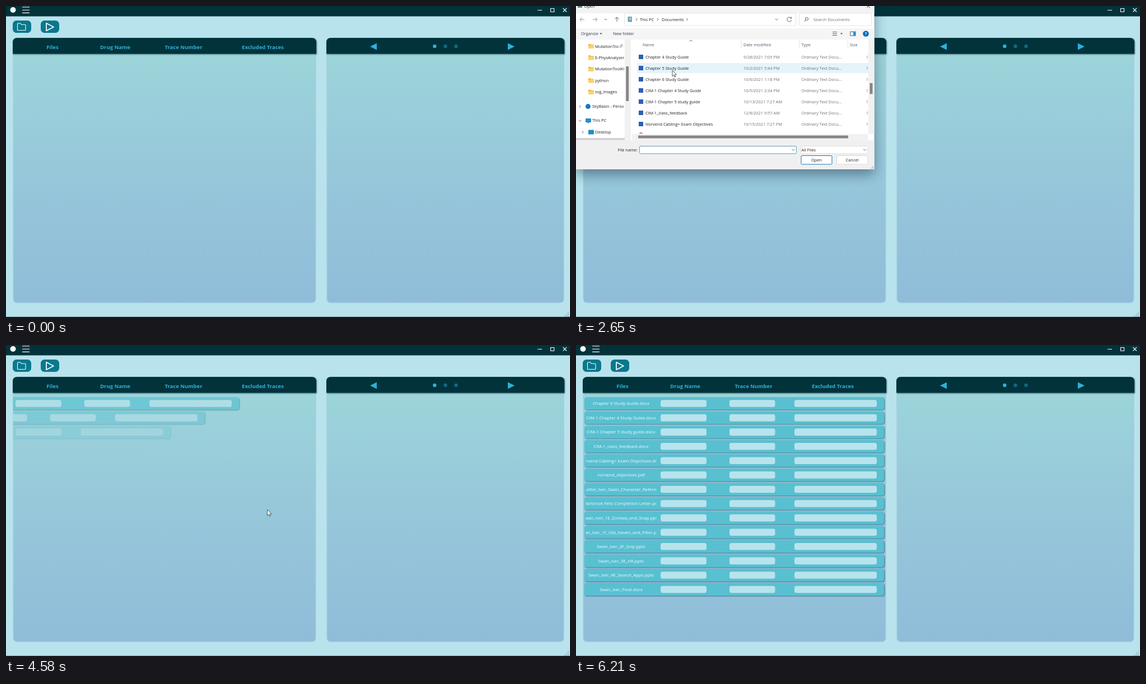
An HTML page for the animation above (6.61 s loop, 1007 px wide and 556 px high).

```html
<!DOCTYPE html>
<html lang="en">
<head>
<meta charset="utf-8">
<title>Trace file picker</title>
<style>
html, body { margin: 0; width: 100%; height: 100%; overflow: hidden; background: #b8e3ec; }
svg { display: block; width: 1007px; height: 556px; font: 7.4px "Open Sans", "Noto Sans", sans-serif; }
text { white-space: pre; }
.head { font-weight: 700; font-size: 9.5px; fill: #2fb0d8; text-anchor: middle; }
.file { font-size: 7.8px; fill: #f2fcfd; text-anchor: middle; }
.bar { filter: drop-shadow(1px 1px 1px rgba(0, 40, 60, .6)); }
.card { filter: drop-shadow(1px 1.5px .8px rgba(20, 80, 110, .7)); }
.sheet { filter: drop-shadow(0 9px 11px rgba(0, 20, 40, .42)); }
.line { fill: none; stroke: #555; stroke-width: .9; }
.white { fill: none; stroke: #fff; stroke-width: 1.1; }
</style>
</head>
<body>
<svg id="stage" viewBox="0 0 1007 556"></svg>
<script>
const LOOP = 6610;
const BURSTS = [[120, 720, 10], [790, 1400, 10], [1460, 2050, 10], [2250, 2850, 9], [2920, 3530, 10],
  [3600, 4230, 10], [4300, 4910, 10], [4980, 5590, 10], [5790, 6210, 7]];
const ticks = [0];
for (const [a, b, n] of BURSTS)
  for (let i = 0; i < n; i++) ticks.push(Math.round((a + (b - a) * i / (n - 1)) / 10) * 10);

// Each key is [time, ...values]
const CURSOR = [[120, 807, 511], [420, 330, 250], [720, 62, 74], [920, 33, 40], [1200, 35, 42], [1330, 51.5, 57.5],
  [1460, 75, 80], [1730, 188, 168], [2250, 188, 168], [2500, 172, 115], [2850, 172, 115], [3120, 172, 139],
  [3210, 172, 139], [3460, 172, 194], [3600, 172, 194], [4000, 420.5, 281], [4300, 420.5, 281],
  [4910, 524.5, 311], [5590, 832, 440], [5790, 832, 440], [6210, 975, 558]];
const SCROLL = [[1520, 0], [1900, 292], [2250, 292], [2650, 532], [2920, 532], [3120, 592], [3210, 592], [3400, 712]];
const DIALOG = [[1200, 0, .88], [1330, .86, .9486], [1400, 1, 1], [4290, 1, 1], [4440, 0, .9]];
const SLIDE = [[0, 0], [.17, .103], [.37, .313], [.57, .493], [.77, .793], [.97, .972], [1, 1]];
const CLICK = 2780, RANGE_CLICK = 3530, FIRST = 28, LAST = 41;

const NAMES = ["Chapter 6 Study Guide", "CIM-1 Chapter 4 Study Guide", "CIM-1 Chapter 5 study guide",
  "CIM-1_class_feedback", "Norvend Cabling+ Exam Objectives", "norvend_objectives",
  "Court_Letter_Iver_Swan_Character_Reference", "Marbrook Fells Completion Letter",
  "Swan_Iver_1E_Zontala_and_Snap", "Swan_Iver_1F_Old_Haven_and_Filter", "Swan_Iver_2F_Snip",
  "Swan_Iver_3E_HR", "Swan_Iver_4E_Search_Apps", "Swan_Iver_Final"];
const FOLDERS = `Oath of Rust Hidden Frontier|7/18/2022 4:40 PM
Oath of Rust Sentinel|7/20/2022 6:19 PM
CSS - Full Layout Primer 2022|7/11/2022 3:01 PM
Custom Office Templates|1/4/2022 5:51 PM
E-PhysAnalyzer|5/13/2022 8:05 PM
E-PhysAnalyzer2|8/31/2022 6:48 PM
E-PhysAnalyzerGUI|5/13/2022 8:05 PM
GUI drafts|8/31/2022 6:50 PM
images|5/13/2022 8:05 PM
labs|5/13/2022 8:05 PM
models|6/2/2022 3:12 PM
MutationToolKit|8/20/2022 1:15 PM
notes|5/13/2022 8:06 PM
plots|5/13/2022 8:06 PM
NetBeansProjects|5/13/2022 8:06 PM
Jotfold Notebooks|5/13/2022 8:06 PM
Python Scripts|3/23/2022 5:22 PM
QtApplicationWithPython|5/17/2022 1:33 PM
QtTemplate|8/14/2022 6:26 PM
R|5/13/2022 8:06 PM
Tandrel|8/15/2022 9:37 PM
temp|6/22/2022 1:07 PM
test_data|7/2/2022 2:20 PM
traces|7/9/2022 4:11 PM`;
const LOOSE = `abstract_draft|9/14/2021 3:10 PM|w|1
Chapter 3 Study Guide|9/21/2021 6:32 PM|w|1
Chapter 4 Study Guide|9/28/2021 7:05 PM|w|1
Chapter 5 Study Guide|10/2/2021 5:44 PM|w|1`;
const DETAILS = `10/6/2021 1:18 PM|w|1
10/5/2021 2:34 PM|w|1
10/13/2021 7:27 AM|w|1
12/8/2021 9:57 AM|w|1
10/15/2021 7:27 PM|w|1
1/6/2022 2:09 PM|h|2,54
8/10/2022 11:06 PM|h|13
8/8/2022 12:41 PM|h|3
1/17/2022 1:51 PM|p|74
1/25/2022 4:58 PM|p|60
2/1/2022 8:10 PM|p|44
2/1/2022 9:20 PM|p|14
2/3/2022 1:31 PM|p|24
3/18/2022 2:29 PM|w|1`.split("\n");
const TYPES = { w: "Ordinary Text Docu...", p: "Ordinary Slide Sho...", h: "Browser HTML Docu...", z: "Compressed (zipped..." };
const EXT = { w: ".docx", p: ".pptx", h: ".pdf" };
const items = [...FOLDERS.split("\n"), ...LOOSE.split("\n"), ...NAMES.map((n, i) => n + "|" + DETAILS[i]),
  "E-PhysAnalyzerGUI|2/23/2022 2:54 PM|z|14"].map(s => s.split("|"));

const rect = (x, y, w, h, fill, more = "") => `<rect x="${x}" y="${y}" width="${w}" height="${h}" fill="${fill}" ${more}/>`;
const path = (d, more = 'class="line"') => `<path d="${d}" ${more}/>`;
const text = (x, y, s, more = 'fill="#222"') => `<text x="${x}" y="${y}" ${more}>${s}</text>`;
const clip = (id, x, y, w, h) => `<clipPath id="${id}">${rect(x, y, w, h, "#000")}</clipPath>`;
const group = (id, body, more = "") => `<g id="${id}" ${more}>${body}</g>`;
const GREY = 'fill="#707070"';
const chevR = (x, y) => path(`M${x - 1.2} ${y - 2.4}l2.4 2.4l-2.4 2.4`);
const chevD = (x, y) => path(`M${x - 2.5} ${y - 1.2}l2.5 2.5l2.5-2.5`);
const folder = (x, y) => path(`M${x} ${y - 4}h4l1.2 1.2h4.8v6.8h-10z`, 'fill="#eeb33c"') + rect(x, y - 1.8, 10, 5.8, "#fbd369", 'rx=".6"');

function icon(kind, y) {
  if (kind === "w") return rect(112, y - 4, 8, 8, "#2b5fb4");
  if (kind === "p") return rect(112, y - 4, 8, 8, "#c8472c");
  if (kind === "h") return `<circle cx="116" cy="${y}" r="4.7" fill="#d9503c"/>`;
  return folder(111, y) + (kind === "z" ? rect(115, y - 3, 2, 6, "#7d8790") : "");
}

function panel(x, w) {
  return path(`M${x + 1} 80h${w - 2}v443q0 7.5-7.5 7.5h${17 - w}q-7.5 0-7.5-7.5z`,
    'fill="url(#sea)" stroke="#a5cce2" stroke-width="1.4"') +
    path(`M${x} 85.5v-20.500q0-8 8-8h${w - 16}q8 0 8 8v20.500z`, 'fill="#02333b" class="bar"');
}

function app() {
  const button = x => rect(x, 26, 33, 22, "#0a788d", 'rx="6.500"');
  let grip = "";
  for (let i = 0; i < 3; i++)
    for (let j = 0; j <= i; j++) grip += rect(1003 - j * 3, 547.5 + i * 3, 1.5, 1.5, "#7d9ca5");
  return rect(0, 0, 1007, 556, "#b8e3ec") + rect(0, 555, 1007, 1, "#86a9b0") + rect(0, 0, 1007, 18.5, "#02333b") +
    '<circle cx="12.500" cy="7" r="5" fill="#fff"/>' +
    path("M29 2h13M29 7.2h13M29 12.400h13", 'class="white"') +
    path("M949 7.500h8M972.500 4.500h6v6h-6zM994.500 4l6.500 6.500m0-6.500l-6.500 6.500", 'class="white"') +
    button(12) + button(62) +
    path("M20.500 42.500v-10.500q0-1 1-1h4l2 2.300h6.500q1 0 1 1v8.200q0 1-1 1h-12.500q-1 0-1-1z", 'class="white"') +
    path("M72 30.700v13.600l13-6.800z", 'class="white" style="stroke-width:1.7;stroke-linejoin:round"') +
    panel(12, 542) + panel(572, 425) +
    [["Files", 83], ["Drug Name", 195], ["Trace Number", 317], ["Excluded Traces", 458.5]]
      .map(([s, x]) => text(x, 77, s, 'class="head"')).join("") +
    path("M650 72.500l12-6v12zM908 72.500l-12-6v12z", 'fill="#2fb0d8"') +
    [765.3, 784.5, 803.5].map((x, i) => `<circle cx="${x}" cy="72" r="3.200" fill="${i ? "#12697d" : "#2fb0d8"}"/>`).join("") +
    grip;
}

function cards() {
  return NAMES.map((n, i) => {
    const y = 104.5 + i * 25.58, kind = DETAILS[i].split("|")[1];
    const cell = (x, w) => rect(x, y - 6.3, w, 12.6, "#b8e3ec", 'rx="3.500"');
    return group("card" + i, rect(15, y - 11, 535, 22, "#58c0d1", 'rx="4" class="card"') +
      cell(151, 82) + cell(274, 81.5) + cell(390, 147) +
      `<g clip-path="url(#name)">${text(80.5, y + 2.8, n + EXT[kind], 'class="file"')}</g>`);
  }).join("");
}

function listRows() {
  return items.map(([name, date, kind, size], i) => {
    const y = 91 + 20 * i, b = y + 2.6;
    return rect(109, y - 9, 413, 18, "none", `id="row${i}"`) + icon(kind, y) + text(124, b, name) +
      text(299, b, date, GREY) + text(402.5, b, TYPES[kind] || "File folder", GREY) +
      (size ? text(522, b, size, GREY + ' text-anchor="end"') : "");
  }).join("");
}

function dialog() {
  const side = [["MutationToc", 72], ["E-PhysAnalyzer.", 92.3], ["MutationToolKit", 112.8], ["python", 133.3], ["svg_images", 153.8]];
  const screen = (x, y) => rect(x, y - 4, 10, 7, "#2a8fd0", 'rx=".8"') + rect(x + 3, y + 3.2, 4, 1, "#55707c");
  const pages = side.map(([, y]) => chevR(13.7, y) +
    path(`M24 ${y - 4.5}h4.500l2.500 2.500v7h-7z`, 'fill="#fff" stroke="#888" stroke-width=".7"')).join("");
  const sidebar = side.map(([s, y], i) => text(34, y + 2.6, s, i ? 'fill="#222"' : 'fill="#222" clip-path="url(#pinned)"')).join("") +
    path("M78 74.500l2-2m-1.500-1.500l3 3m-2-3.500l2.500-1.800l1.300 1.300l-1.800 2.500", 'class="line" style="stroke:#567"') +
    text(29, 182.2, "SkyBasin - Personal") + chevR(7, 179.6) +
    chevD(7, 205) + screen(17, 205) + text(29, 207.4, "This PC") +
    chevR(12, 225.5) + rect(22, 221.500, 10, 8, "#1d8fc7", 'rx="1"') + text(34, 228, "Desktop");
  const base = rect(-1, -12, 533.5, 304, "#fff", 'rx="3" class="sheet"') +
    rect(-1, -12, 533.5, 25, "#f3f3f3") + rect(-1, 239.5, 533.5, 52.5, "#f0f0f0") +
    rect(3, -4, 8, 7, "#5c8290") + text(14.5, 2.5, "Open") + path("M519-2.800l6 6m0-6l-6 6", 'class="line" style="stroke:#222"') +
    rect(87, 60, 11, 179, "#f1f1f1") + rect(89.3, 108, 4.8, 62, "#858585") + rect(0, 236, 87, 3.5, "#cfcfcf") +
    rect(522, 60, 10.5, 169, "#f1f1f1") + rect(100, 229, 422, 10.5, "#f1f1f1") + rect(111, 231.5, 375, 5, "#858585") +
    rect(521, 229, 11, 11, "#fff") +
    [["Name", 119], ["Date modified", 299], ["Type", 402.5], ["Size", 489]].map(([s, x]) => text(x, 71.6, s, 'fill="#4c5a68"')).join("") +
    path("M295 61v15M398.500 61v15M485.500 61v15", 'stroke="#e2e2e2" stroke-width="1"') + path("M202.700 63.200l2.300-2.200l2.300 2.200") +
    rect(113, 250, 280.5, 14, "#fff") + rect(401, 250, 120, 14, "#fff") + rect(402, 267.5, 55, 16, "#fff", 'rx="1.500"') +
    rect(465, 267.5, 56, 16, "#fff", 'rx="1.500"') +
    `<g clip-path="url(#side)">${sidebar}</g>`;
  const bare = pages + rect(77, 251, 33.500, 10.500, "#fff") + rect(521, 281, 11, 10.500, "#fff");
  const box = (x, y, w, h, c) => rect(x, y, w, h, "none", `stroke="${c}" rx="1.500"`);
  const full = side.map(([, y]) => folder(22, y)).join("") + '<circle cx="21.500" cy="179.600" r="4.500" fill="#1478c8"/>' +
    rect(-1, 40, 533.5, 20, "#f5f5f5") +
    path("M15 24h-8m3.500-3.500l-3.500 3.500l3.500 3.500M30 24h8m-3.500-3.500l3.500 3.500l-3.500 3.500", 'class="line" style="stroke:#888"') +
    path("M51 23l2 2l2-2M73 28v-8m-3.500 3.500l3.500-3.500l3.500 3.500") +
    box(86.5, 13, 306, 22, "#e3e3e3") + box(398.5, 13, 129, 22, "#e3e3e3") +
    rect(92.5, 19, 7.5, 9.500, "#6f9fb0", 'rx="1"') + rect(95, 21, 3.5, 1, "#fff") + rect(95, 23.500, 3.5, 1, "#fff") +
    chevR(108, 24) + chevR(146, 24) + chevR(198.5, 24) + text(114, 26.5, "This PC") + text(153, 26.5, "Documents") +
    chevD(358, 24) + path("M384 21.500a4 4 0 1 0 .8 3.500M384.500 19.500v2.500h-2.500") +
    '<circle cx="412" cy="23" r="2.600" class="line"/>' + path("M410 25l-2.500 2.500") + text(424, 26.5, "Search Documents", GREY) +
    text(9, 52.4, "Organize", 'fill="#243c56"') + text(66, 52.4, "New folder", 'fill="#243c56"') +
    path("M42.500 48.500h4l-2 2.300zM472 48.500h4l-2 2.300z", 'fill="#333"') +
    path("M458 46.500h8M458 49.500h8M458 52.500h8") + rect(490, 46, 9, 7, "#fff", 'stroke="#456"') + rect(495, 46, 4, 7, "#2a8fd0") +
    '<circle cx="517.500" cy="49.500" r="5.300" fill="#0b6cb8"/>' + text(517.5, 52.3, "?", 'fill="#fff" text-anchor="middle" font-weight="700"') +
    text(110, 259.6, "File name:", 'fill="#222" text-anchor="end"') + box(113.5, 250.5, 280, 13.5, "#5c9dc0") + chevD(388, 257) +
    text(402.5, 259.6, "All Files") + box(401.5, 250.5, 119.5, 13.5, "#dedede") + chevD(515.5, 257) +
    box(402, 267.5, 55, 15.5, "#0a78c0") + text(429.5, 278.2, "Open", 'fill="#222" text-anchor="middle"') +
    box(465.5, 267.5, 55.5, 15.5, "#d8d8d8") + text(493, 278.2, "Cancel", 'fill="#222" text-anchor="middle"') +
    path("M526.500 291l5-5M529 291l2.500-2.500", 'class="line" style="stroke:#999"') +
    `<g clip-path="url(#field)">${text(115, 259.6, "", 'id="entry" fill="#222"')}</g>`;
  return base + `<g clip-path="url(#list)">${group("rows", listRows())}</g>` +
    rect(524.5, 0, 5, 19.5, "#858585", 'id="thumb"') + group("bare", bare) + group("full", full) +
    group("arrows", path("M106.500 232l-2 2l2 2M514.500 232l2 2l-2 2", 'class="line" style="stroke:#aaa"'));
}

document.getElementById("stage").innerHTML =
  '<defs><linearGradient id="sea" x1="0" y1="0" x2="0" y2="1"><stop offset="0" stop-color="#9cd5da"/>' +
  '<stop offset=".45" stop-color="#97c8da"/><stop offset="1" stop-color="#90bcd9"/></linearGradient>' +
  clip("name", 17.5, 86, 126, 440) + clip("panel", 12.5, 86, 541, 440) + clip("side", 0, 61, 86, 174) +
  clip("pinned", 0, 61, 76.500, 20) + clip("list", 109, 77, 413, 151) + clip("field", 114, 250, 268, 14) + "</defs>" +
  app() + `<g clip-path="url(#panel)">${cards()}</g>` + group("dialog", dialog()) +
  group("cursor", path("M0 0v10.700l2.500-2.300l1.700 3.800l1.700-.8l-1.700-3.600h3.400z", 'fill="#fff" stroke="#333" stroke-width=".8"'));

const $ = id => document.getElementById(id);
const show = (id, on) => $(id).setAttribute("visibility", on ? "inherit" : "hidden");
const move = (id, x, y, s = 1) => $(id).setAttribute("transform", `translate(${x} ${y}) scale(${s})`);

function at(keys, t) {
  const i = keys.findIndex(k => k[0] > t);
  if (i === 0) return keys[0].slice(1);
  if (i < 0) return keys[keys.length - 1].slice(1);
  const a = keys[i - 1], b = keys[i], p = (t - a[0]) / (b[0] - a[0]);
  return a.slice(1).map((v, j) => v + (b[j + 1] - v) * p);
}

function drawDialog(t, cy) {
  const [alpha, size] = at(DIALOG, t);
  $("dialog").setAttribute("opacity", alpha);
  show("dialog", alpha > 0);
  if (!alpha) return;
  move("dialog", 216 * (1 - size), 115 * (1 - size), size);
  const [scroll] = at(SCROLL, t);
  move("rows", 0, -scroll);
  $("thumb").setAttribute("y", 71.5 + scroll * .1275);
  const ready = t >= 1400;
  show("bare", !ready);
  show("full", ready);
  show("arrows", t >= 3800);
  const end = t >= RANGE_CLICK ? LAST : t >= CLICK ? FIRST : -1;
  const hover = t > 2250 && cy < 228 ? Math.floor((cy + scroll - 81) / 20) : -1;
  items.forEach((_, i) => $("row" + i).setAttribute("fill",
    i >= FIRST && i <= end ? "#cce8ff" : i === hover ? "#e5f3fb" : "none"));
  const quote = s => `"${s}"`;
  $("entry").textContent = end === LAST ? [NAMES[13], ...NAMES.slice(0, 4)].map(quote).join(" ") : end === FIRST ? NAMES[0] : "";
}

function draw(now) {
  const real = now % LOOP;
  let t = 0;
  for (const k of ticks) if (k <= real) t = k;
  const [x, y] = at(CURSOR, t);
  show("cursor", t >= 120);
  move("cursor", x, y);
  drawDialog(t, y);
  NAMES.forEach((_, i) => {
    const u = Math.min(1, Math.max(0, (t - 4417.5 - i * 50) / 250));
    move("card" + i, -300 * (1 - at(SLIDE, u)[0]), 0);
    $("card" + i).setAttribute("opacity", Math.min(1, u * 1.1));
  });
}

function frame() {
  draw(performance.now());
  requestAnimationFrame(frame);
}
frame();
</script>
</body>
</html>
```
